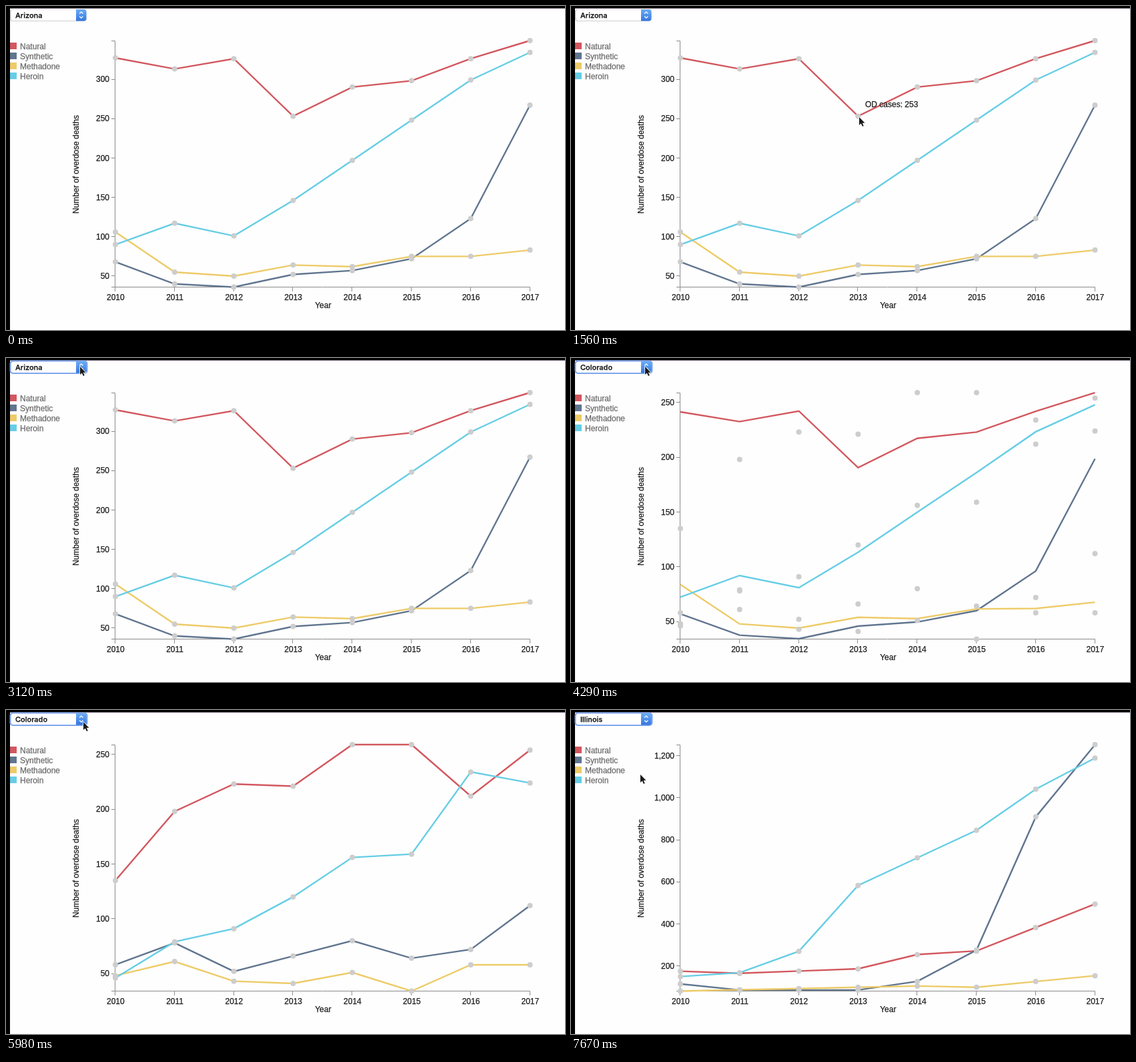
Animation, 838 px wide and 487 px high, one loop 8 s. Source, as an HTML page with a canvas:

```html
<!DOCTYPE html>
<html lang="en">
<head>
<meta charset="utf-8">
<title>Overdose deaths by state</title>
<style>
html, body { margin: 0; width: 100%; height: 100%; overflow: hidden; background: #fefefe; }
canvas { display: block; }
</style>
</head>
<body>
<canvas id="stage" width="838" height="487"></canvas>
<script>
const ctx = document.getElementById('stage').getContext('2d');
const LOOP = 8000, STEP = 130, GLIDE = 500;
const LEFT = 164, RIGHT = 785.5, TOP = 52, BOTTOM = 422.5;
const SANS = '12px "Liberation Sans", Arial, sans-serif';
const UI = '500 11px Inter, Roboto, sans-serif';
const GREY = '#8c8c8c';

const lerp = (a, b, k) => a + (b - a) * k;
const clamp = v => Math.max(0, Math.min(1, v));
const cubic = v => v < 0.5 ? 4 * v ** 3 : 1 - 4 * (1 - v) ** 3;
const smooth = v => v * v * (3 - 2 * v);
const xOf = i => lerp(LEFT, RIGHT, i / 7);
const yOf = (s, v) => lerp(BOTTOM, TOP, (v - s.min) / (s.max - s.min));
const crisp = v => Math.floor(v) + 0.5;

const series = [
  ['Natural', '#d2575e'],
  ['Synthetic', '#60758f'],
  ['Methadone', '#edcb68'],
  ['Heroin', '#66cde5']
];

// Years on a straight run are left open (_) and filled between neighbours.
const _ = null;
const fill = row => row.map((v, i) => {
  if (v !== _) return v;
  let a = i, b = i;
  while (row[a] === _) a--;
  while (row[b] === _) b++;
  return lerp(row[a], row[b], (i - a) / (b - a));
});

// Round tick step of 1, 2, 5 or 10 times a power of ten, about five ticks
function tickStep(span) {
  const base = 10 ** Math.floor(Math.log10(span / 5)), r = span / 5 / base;
  return base * (r > 7.07 ? 10 : r > 3.16 ? 5 : r > 1.41 ? 2 : 1);
}

function state(name, from, ...rows) {
  const data = rows.map(fill), all = data.flat();
  const min = Math.min(...all), max = Math.max(...all);
  return { name, from, data, min, max, tick: tickStep(max - min) };
}

const states = [
  state('Arizona', -LOOP,
    [327, 313, 326, 253, 290, 298, 326, 349],
    [68, 40, 36, 52, 57, 72, 123, 267],
    [106, 55, 50, 64, 62, 75, 75, 83],
    [90, 117, 101, 146, _, _, 299, 334]),
  state('Colorado', 4210,
    [135, 198, 223, 221, 259, 259, 212, 254],
    [58, 78, 52, _, 80, 64, 72, 112],
    [48, 61, 43, 41, 51, 34, 58, 58],
    [46, 79, 91, 120, 156, 159, 234, 224]),
  state('Illinois', 7200,
    [175, 165, _, 186, 254, 271, _, 494],
    [115, 86, _, 86, 127, 276, 909, 1252],
    [81, _, _, _, 105, 99, _, 154],
    [150, 168, 270, 583, _, 845, 1040, 1188])
];

// Pointer stops: arrival, travel time, place
const stops = [
  { at: 520, dur: 1, x: 836, y: 474 },
  { at: 1560, dur: 1040, x: 432, y: 167 },
  { at: 3120, dur: 910, x: 111, y: 13 },
  { at: 5980, dur: 1820, x: 116, y: 18 },
  { at: 7280, dur: 130, x: 104, y: 97 }
];

function text(str, x, y, align = 'left', color = '#1c1c1c', font = SANS) {
  ctx.font = font;
  ctx.textAlign = align;
  ctx.fillStyle = ctx.strokeStyle = color;
  ctx.lineWidth = 0.25;
  ctx.fillText(str, x, y);
  ctx.strokeText(str, x, y);
}

function stroke(points, color = GREY, width = 1) {
  ctx.beginPath();
  for (const [x, y] of points) ctx.lineTo(x, y);
  ctx.strokeStyle = color;
  ctx.lineWidth = width;
  ctx.stroke();
}

function box(x, y, w, h, r, paint) {
  ctx.beginPath();
  ctx.roundRect(x, y, w, h, r);
  ctx.fillStyle = paint;
  ctx.fill();
}

function drawSelect(name, focused) {
  if (focused) box(5.5, 3.5, 117, 20.5, 5, '#7ea6ec');
  else box(6, 5, 114.5, 18, 4, '#cfcfcf');
  box(7.5, 5.5, 112, 16.5, 3.5, '#fff');
  const blue = ctx.createLinearGradient(0, 5, 0, 22);
  blue.addColorStop(0, '#6caef5');
  blue.addColorStop(1, '#3577e0');
  box(105, 5, 15.5, 17.5, [0, 4, 4, 0], blue);
  for (const d of [-1, 1]) {
    const y = 13.5 + d * 2;
    stroke([[110.2, y], [112.8, y + d * 2.6], [115.4, y]], '#fff', 1.3);
  }
  text(name, 14, 17.5, 'left', '#111', UI);
}

function drawLegend() {
  series.forEach(([name, color], i) => {
    ctx.fillStyle = color;
    ctx.fillRect(6, 55 + i * 15, 10, 10);
    text(name, 21, 64.5 + i * 15, 'left', '#6b6b6b');
  });
}

function drawAxes(s) {
  stroke([[158, TOP + 0.5], [163.5, TOP + 0.5], [163.5, BOTTOM], [158, BOTTOM]]);
  stroke([[163.5, BOTTOM], [RIGHT, BOTTOM]]);
  for (let v = Math.ceil(s.min / s.tick) * s.tick; v <= s.max; v += s.tick) {
    const y = yOf(s, v);
    stroke([[158, crisp(y)], [164, crisp(y)]]);
    text(v.toLocaleString('en-US'), 155, y + 4.2, 'right');
  }
  for (let i = 0; i < 8; i++) {
    const x = crisp(xOf(i) - 0.5);
    stroke([[x, BOTTOM], [x, 429]]);
    text(2010 + i, xOf(i) + 0.3, 441.5, 'center');
  }
  text('Year', 475.3, 454, 'center');
  ctx.save();
  ctx.translate(109, 238);
  ctx.rotate(-Math.PI / 2);
  text('Number of overdose deaths', 0, 0, 'center');
  ctx.restore();
}

function drawData(s, old, k) {
  s.data.forEach((row, n) => {
    const pts = row.map((v, i) => [xOf(i), lerp(yOf(old, old.data[n][i]), yOf(s, v), k)]);
    stroke(pts, series[n][1], 2.4);
  });
  ctx.fillStyle = '#cdcdcd';
  for (const row of s.data) row.forEach((v, i) => {
    ctx.beginPath();
    ctx.arc(xOf(i), yOf(s, v), 4, 0, Math.PI * 2);
    ctx.fill();
  });
}

function drawPointer(t) {
  const n = stops.findLastIndex(p => t > p.at - p.dur);
  if (n < 1) return;
  const a = stops[n - 1], b = stops[n];
  const k = smooth(clamp(1 - (b.at - t) / b.dur));
  ctx.save();
  ctx.translate(lerp(a.x, b.x, k), lerp(a.y, b.y, k));
  const arrow = new Path2D('M0 0V12L2.8 9.4 4.8 14 6.7 13.2 4.8 8.7H8.5Z');
  ctx.lineJoin = 'round';
  ctx.lineWidth = 1.6;
  ctx.strokeStyle = '#fff';
  ctx.stroke(arrow);
  ctx.fillStyle = '#1a1a1a';
  ctx.fill(arrow);
  ctx.restore();
}

function draw(t) {
  const n = states.findLastIndex(s => t >= s.from);
  const s = states[n], old = states[Math.max(0, n - 1)];
  ctx.fillStyle = '#000';
  ctx.fillRect(0, 0, 838, 487);
  ctx.fillStyle = '#6b6070';
  ctx.fillRect(6, 3, 832, 1);
  ctx.fillStyle = '#fefefe';
  ctx.fillRect(6, 4, 832, 483);
  drawSelect(s.name, t >= 3120);
  drawLegend();
  drawAxes(s);
  drawData(s, old, cubic(clamp((t - s.from) / GLIDE)));
  if (t >= 1560 && t < 2340) text('OD cases: 253', 441, 152);
  drawPointer(t);
}

const start = performance.now();
function frame() {
  const t = (performance.now() - start) % LOOP;
  draw(Math.floor(t / STEP) * STEP);
  requestAnimationFrame(frame);
}
frame();
</script>
</body>
</html>
```
